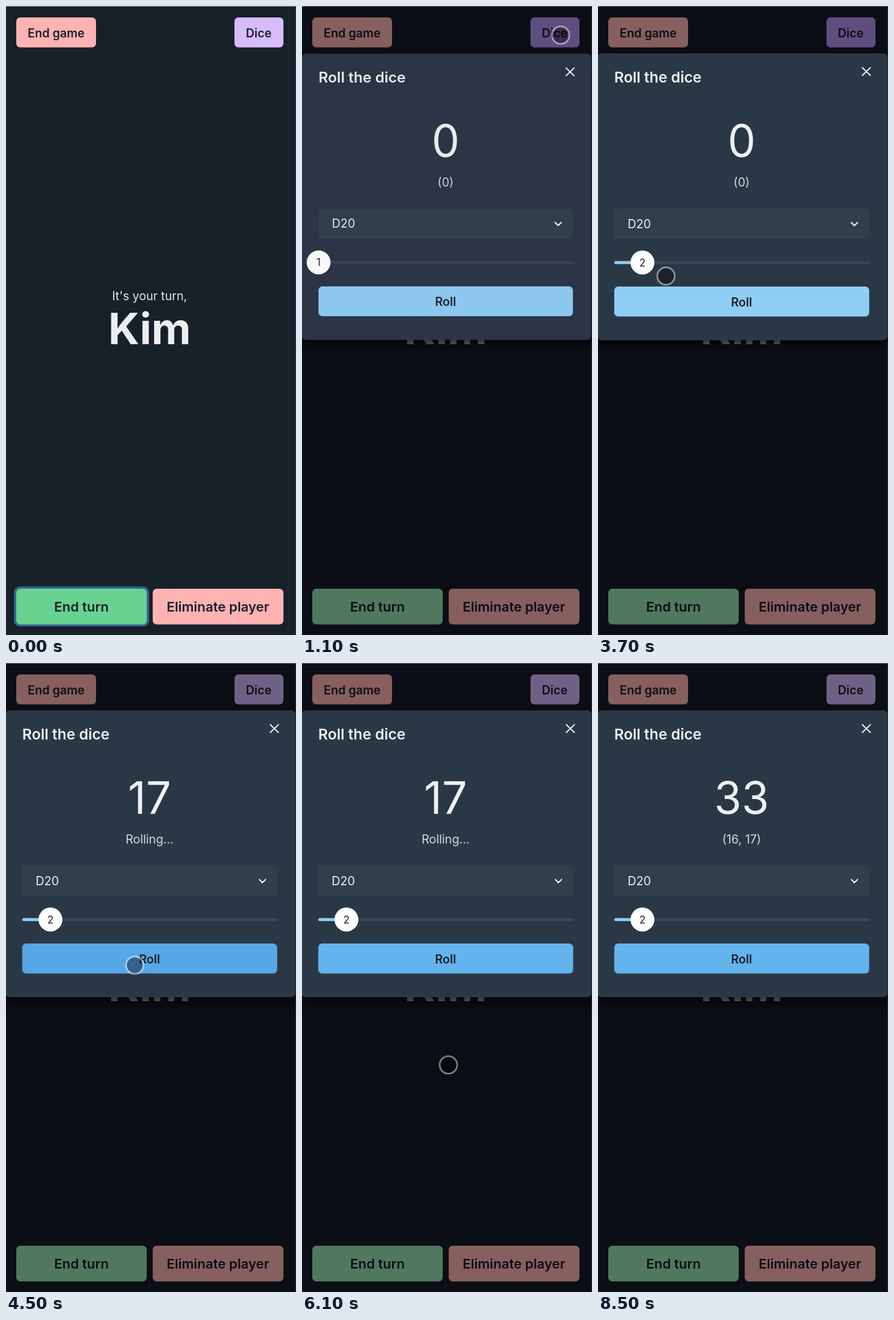
These frames come from a looping animation (509x1101 px, 8700 ms). An HTML page with a canvas:

```html
<!DOCTYPE html>
<html lang="en">
<head>
<meta charset="utf-8">
<title>Dice roller</title>
<style>
  html, body { margin: 0; width: 100%; height: 100%; overflow: hidden; background: #18202a; }
  canvas { display: block; width: 100%; height: 100%; }
</style>
</head>
<body>
<canvas id="stage"></canvas>
<script>
const W = 509, H = 1101, LOOP = 8700;
const FONT = 'Inter, "Liberation Sans", sans-serif';
const INK = '#1a202c', LIGHT = '#edeff1';

const OPEN = 1100, DRAG = 2900, STEP = 3100, RELEASE = 3500;
const PRESS = 4300, LIFT = 4900, RESULT = 6900;

// Pointer stops: time, x, y
const PATH = [
  [300, 330, 420], [700, 454, 51], [1300, 454, 51], [2500, 36, 451], [2900, 36, 451],
  [3300, 82, 453], [3500, 82, 453], [4100, 226, 529], [5100, 226, 529], [5900, 257, 703.5]
];
const POINTER_IN = 300, POINTER_OUT = 6500;

const canvas = document.getElementById('stage');
const ctx = canvas.getContext('2d');

function resize() {
  const ratio = window.devicePixelRatio || 1;
  canvas.width = Math.round(innerWidth * ratio);
  canvas.height = Math.round(innerHeight * ratio);
}

function box(x, y, w, h, r, color) {
  ctx.fillStyle = color;
  ctx.beginPath();
  ctx.roundRect(x, y, w, h, r);
  ctx.fill();
}

function disc(x, y, r, color) {
  ctx.fillStyle = color;
  ctx.beginPath();
  ctx.arc(x, y, r, 0, Math.PI * 2);
  ctx.fill();
}

function line(points, color, width) {
  ctx.strokeStyle = color;
  ctx.lineWidth = width;
  ctx.lineCap = ctx.lineJoin = 'round';
  ctx.beginPath();
  points.forEach(([x, y]) => ctx.lineTo(x, y));
  ctx.stroke();
}

function label(text, x, y, size, weight, color, align = 'center') {
  ctx.font = `${weight} ${size}px ${FONT}`;
  ctx.textAlign = align;
  ctx.fillStyle = color;
  ctx.fillText(text, x, y);
}

function drawPage(t) {
  const dim = t >= OPEN;
  const pick = (normal, dimmed) => dim ? dimmed : normal;
  const pink = pick('#feb2b2', '#875f5e');
  const ink = pick(INK, '#0c0e15');
  const dice = pick('#d6bcfa', t < PRESS ? '#5f4d80' : '#6d6285');

  ctx.fillStyle = pick('#18202a', '#0b0e15');
  ctx.fillRect(0, 0, W, H);
  ctx.fillStyle = pick('#8f99a3', '#70777f');
  ctx.fillRect(0, 0, W, 1);
  ctx.fillStyle = pick('#343d47', '#2a2f36');
  ctx.fillRect(508, 0, 1, H);

  box(18, 20, 140, 52.5, 7, pink);
  label('End game', 88, 54.5, 20.9, 600, ink);
  box(401, 20, 86, 52.5, 7, dice);
  label('Dice', 443.5, 54.5, 20.9, 600, ink);

  label("It's your turn,", 252, 515, 20.9, 400, pick('#e1e4e6', '#6c6e72'));
  label('Kim', 252, 592, 76, 700, pick('#eceded', '#707174'));

  if (!dim) box(14, 1016, 237, 70, 10, '#346494');
  box(18, 1020, 229, 62.5, 7, pick('#68d391', '#4f785f'));
  label('End turn', 132.5, 1059.5, 23.5, 600, ink);
  box(257.5, 1020, 229.5, 62.5, 7, pink);
  label('Eliminate player', 372, 1059.5, 23.5, 600, ink);
}

function drawSlider(t) {
  const two = t >= STEP;
  const x = two ? 78 : 28.7;
  const r = t >= DRAG && t < RELEASE ? 24 : 21;
  box(28.5, 446.5, 447.5, 5.2, 2.6, '#3a4654');
  if (two) box(28.5, 446.5, 49.5, 5.2, 2.6, '#90cdf4');
  disc(x, 449, r, '#fff');
  label(two ? '2' : '1', x, 455.5, 18, 400, INK);
}

function drawDialog(t) {
  let total = '0', detail = '(0)', roll = '#90cdf4';
  if (t >= PRESS) {
    total = '17';
    detail = 'Rolling...';
    roll = t < LIFT ? '#57a6e6' : '#63b3ed';
  }
  if (t >= RESULT) {
    total = '33';
    detail = '(16, 17)';
  }

  ctx.save();
  if (t < OPEN + 200) {
    ctx.globalAlpha = 0.97;
    ctx.translate(W / 2, 334);
    ctx.scale(0.998, 0.998);
    ctx.translate(-W / 2, -334);
  }
  ctx.save();
  ctx.shadowColor = 'rgba(0,0,0,.6)';
  ctx.shadowBlur = 18;
  ctx.shadowOffsetY = 9;
  box(-1, 83, 509, 502, 7, t < OPEN + 200 ? '#2d3748' : '#2a3846');
  ctx.restore();

  label('Roll the dice', 28.5, 133.5, 26, 600, LIGHT, 'left');
  line([[464, 108], [478, 121.5]], LIGHT, 2.2);
  line([[478, 108], [464, 121.5]], LIGHT, 2.2);
  label(total, 252, 263.5, 78, 400, LIGHT);
  label(detail, 252, 316, 20.9, 400, '#d5d9dd');

  box(28.5, 355, 447.5, 52, 6, '#323f4b');
  label('D20', 52, 388.5, 20.9, 400, LIGHT, 'left');
  line([[444.5, 379], [450, 384.3], [455.5, 379]], LIGHT, 2.3);

  drawSlider(t);

  box(28.5, 491, 447.5, 52.5, 7, roll);
  label('Roll', 252, 525.5, 20.9, 600, INK);
  ctx.restore();
}

function pointerAt(t) {
  const next = PATH.findIndex(stop => stop[0] > t);
  if (next < 0) return PATH[PATH.length - 1].slice(1);
  if (next === 0) return PATH[0].slice(1);
  const [t0, x0, y0] = PATH[next - 1], [t1, x1, y1] = PATH[next];
  const p = (t - t0) / (t1 - t0), e = p * p * (3 - 2 * p);
  return [x0 + (x1 - x0) * e, y0 + (y1 - y0) * e];
}

function drawPointer(t) {
  if (t < POINTER_IN || t >= POINTER_OUT) return;
  const [x, y] = pointerAt(t);
  disc(x, y, 14, 'rgba(0,0,0,.4)');
  ctx.strokeStyle = 'rgba(255,255,255,.45)';
  ctx.lineWidth = 3;
  ctx.beginPath();
  ctx.arc(x, y, 15.3, 0, Math.PI * 2);
  ctx.stroke();
}

// The picture advances every 200 ms, after a short first hold.
function stepTime(ms) {
  const t = ms % LOOP;
  return t < 100 ? 0 : 100 + Math.floor((t - 100) / 200) * 200;
}

function render(now) {
  const t = stepTime(now - start);
  ctx.setTransform(canvas.width / W, 0, 0, canvas.height / H, 0, 0);
  drawPage(t);
  if (t >= OPEN) drawDialog(t);
  drawPointer(t);
  requestAnimationFrame(() => render(performance.now()));
}

addEventListener('resize', resize);
resize();
const start = performance.now();
render(start);
</script>
</body>
</html>
```
